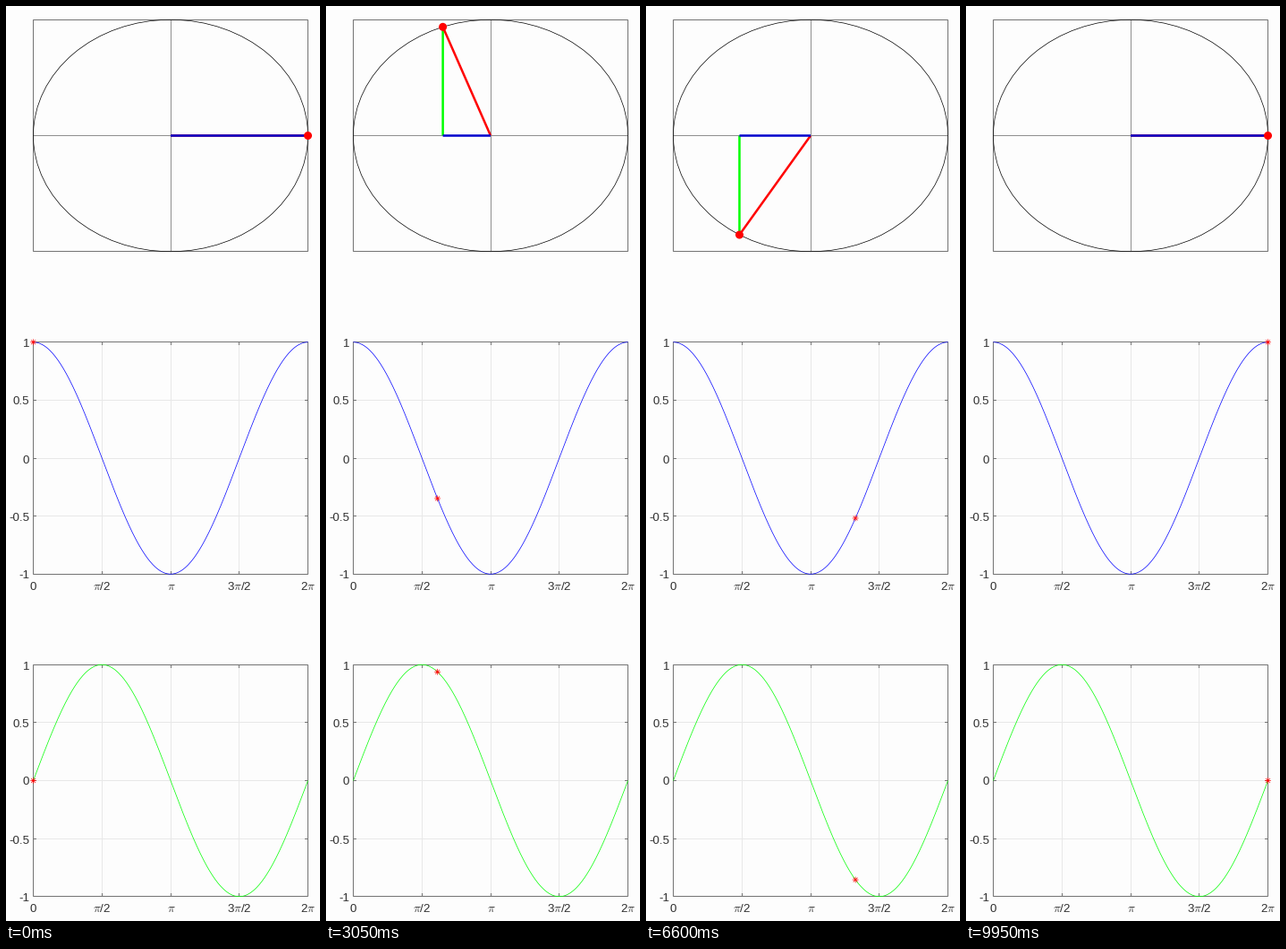
Animation of 351x1020 px, one loop 10 s. Source, as a matplotlib script:

```python
import numpy as np
import matplotlib.pyplot as plt
from matplotlib.animation import FuncAnimation
from matplotlib.patches import Circle, Ellipse, Rectangle

W, H, DPI = 351, 1020, 96
PX = 72 / DPI
FRAMES, LOOP_MS = 200, 10000

LEFT, WIDTH, HEIGHT = 30.5, 307, 258.5
RIGHT = LEFT + WIDTH
CX, RX, RY = LEFT + WIDTH / 2, WIDTH / 2, HEIGHT / 2
CIRCLE_Y, COS_Y, SIN_Y = 144.5, 504, 863.5
FRAME_COLOR, GRID_COLOR, TEXT_COLOR = "#747474", "#e8e8e8", "#303030"

plt.rcParams["font.family"] = "Liberation Sans"
plt.rcParams["mathtext.fontset"] = "cm"
plt.rcParams["path.snap"] = False

fig = plt.figure(figsize=(W / DPI, H / DPI), dpi=DPI, facecolor="#fdfdfd")
ax = fig.add_axes([0, 0, 1, 1])
ax.set_xlim(0, W)
ax.set_ylim(H, 0)
ax.axis("off")

# Four strokes through the centre, separated by gaps
ARMS = np.array([(s * np.cos(a), s * np.sin(a))
                 for a in np.arange(4) * np.pi / 4
                 for s in (-3.4, 3.4, np.nan)])


def mid(v):
    """Centre of the pixel that holds v, for crisp straight lines."""
    return np.floor(v) + 0.5


def line(xs, ys, color, width, z):
    return ax.plot(xs, ys, color=color, lw=width * PX, zorder=z,
                   solid_capstyle="butt")[0]


def rule(x0, y0, x1, y1, color, z):
    line([x0, x1], [y0, y1], color, 1, z)


def frame(cy):
    top, bottom = mid(cy - RY), mid(cy + RY)
    ax.add_patch(Rectangle((LEFT, top), WIDTH, bottom - top, fill=False,
                           ec=FRAME_COLOR, lw=PX, zorder=2))
    return top, bottom


def label(x, y, text, align):
    ax.text(x, y, text, size=13.33 * PX, color=TEXT_COLOR, ha=align,
            va="baseline", zorder=2)


def graph(cy, func, color):
    """Draw one wave panel and return its moving star."""
    top, bottom = frame(cy)
    x_names = ["0", r"$\pi$/2", r"$\pi$", r"3$\pi$/2", r"2$\pi$"]
    for i, name in enumerate(x_names):
        x = mid(LEFT + WIDTH * i / 4)
        if 0 < i < 4:
            rule(x, top, x, bottom, GRID_COLOR, 1)
            rule(x, top, x, top + 3.5, FRAME_COLOR, 2)
            rule(x, bottom - 3.5, x, bottom, FRAME_COLOR, 2)
        label(x, bottom + 17.5, name, "center")
    for i, name in enumerate(["1", "0.5", "0", "-0.5", "-1"]):
        y = mid(cy - RY + HEIGHT * i / 4)
        if 0 < i < 4:
            rule(LEFT, y, RIGHT, y, GRID_COLOR, 1)
            rule(LEFT, y, LEFT + 3.5, y, FRAME_COLOR, 2)
            rule(RIGHT - 3.5, y, RIGHT, y, FRAME_COLOR, 2)
        label(26, y + 5, name, "right")
    t = np.linspace(0, 2 * np.pi, 300)
    line(LEFT + WIDTH * t / (2 * np.pi), cy - RY * func(t), color, 0.7, 3)
    return line([], [], "red", 0.7, 6)


def place_star(star, x, y):
    star.set_data(x + ARMS[:, 0], y + ARMS[:, 1])


# Circle panel
top, bottom = frame(CIRCLE_Y)
rule(LEFT, CIRCLE_Y, RIGHT, CIRCLE_Y, "#909090", 1)
rule(mid(CX), top, mid(CX), bottom, "#909090", 1)
ax.add_patch(Ellipse((CX, CIRCLE_Y), 2 * RX, 2 * RY, fill=False,
                     ec="black", lw=0.7 * PX, zorder=3))
sine = line([], [], "#00ff00", 2.5, 4)
radius = line([], [], "red", 2.5, 4.5)
cosine = line([], [], "#0000cc", 2.5, 5)
dot = ax.add_patch(Circle((RIGHT, CIRCLE_Y), 4.5, fc="red", lw=0, zorder=6))

# Wave panels
cos_star = graph(COS_Y, np.cos, "blue")
sin_star = graph(SIN_Y, np.sin, "#00ff00")


def update(i):
    a = 2 * np.pi * i / (FRAMES - 1)
    x, y = CX + RX * np.cos(a), CIRCLE_Y - RY * np.sin(a)
    sine.set_data([x, x], [CIRCLE_Y, y])
    radius.set_data([CX, x], [CIRCLE_Y, y])
    cosine.set_data([CX, x], [CIRCLE_Y, CIRCLE_Y])
    dot.center = x, y
    step = LEFT + WIDTH * i / (FRAMES - 1)
    place_star(cos_star, step, COS_Y - RY * np.cos(a))
    place_star(sin_star, step, SIN_Y - RY * np.sin(a))
    return sine, radius, cosine, dot, cos_star, sin_star


anim = FuncAnimation(fig, update, frames=FRAMES, interval=LOOP_MS / FRAMES,
                     repeat=True, repeat_delay=0, cache_frame_data=False)
plt.show()
```
